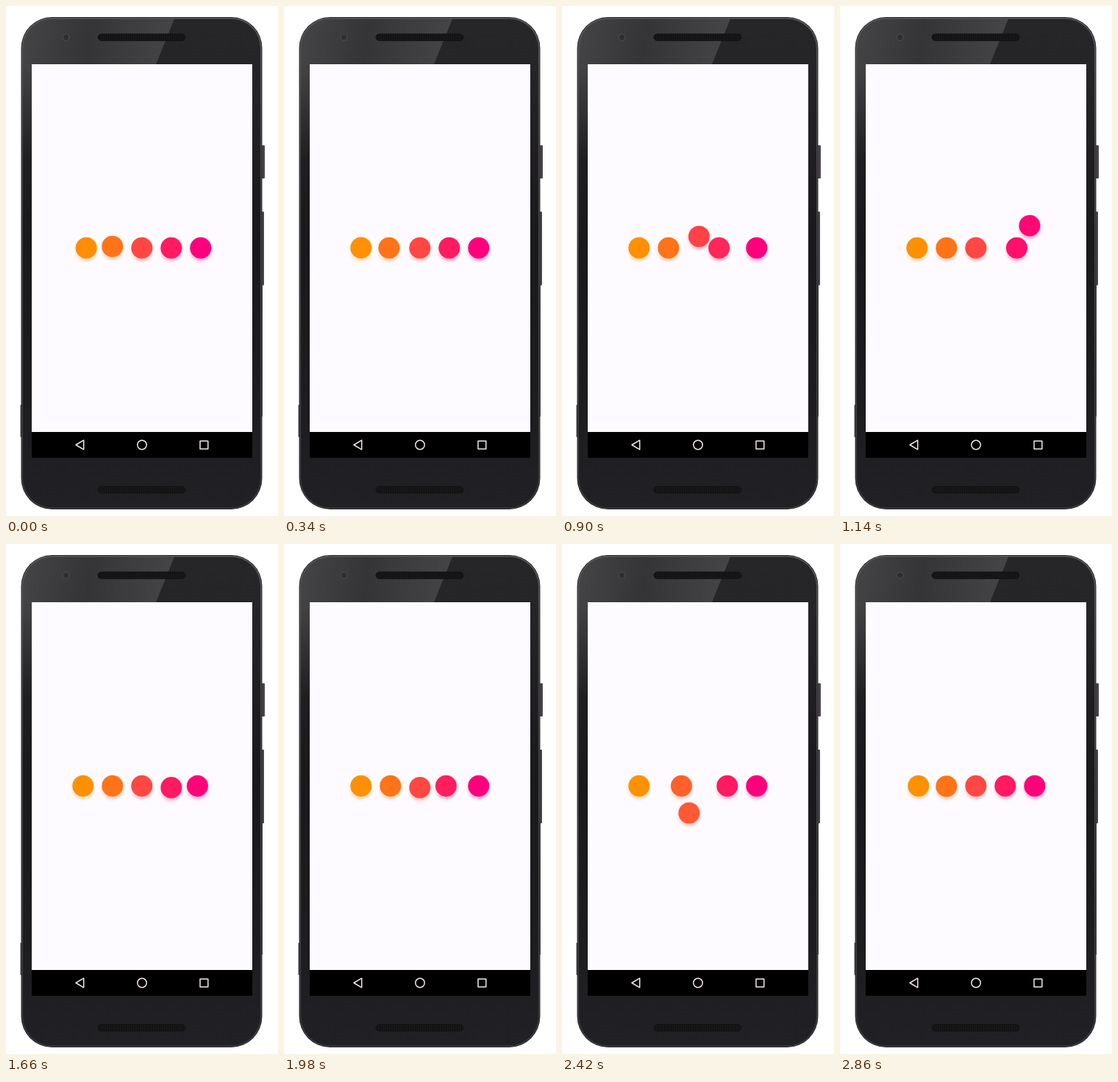
Write an HTML page that moves like this. It is 370 px wide and 692 px high and loops after 3.18 s.

```html
<!DOCTYPE html>
<html lang="en">
<head>
<meta charset="utf-8">
<title>Dot loader</title>
<style>
  html, body { margin: 0; width: 100%; height: 100%; overflow: hidden; background: #fff; }
  svg { display: block; width: 370px; height: 692px; }
  .shadow { opacity: .32; filter: blur(2px); }
</style>
</head>
<body>
<svg viewBox="0 0 370 692">
  <defs>
    <linearGradient id="body" x1="0" y1="0" x2="0" y2="1">
      <stop offset="0" stop-color="#262628"/>
      <stop offset=".1" stop-color="#252527"/>
      <stop offset=".45" stop-color="#19191b"/>
      <stop offset=".8" stop-color="#1d1d20"/>
      <stop offset="1" stop-color="#212125"/>
    </linearGradient>
    <linearGradient id="rim" x1="0" y1="0" x2="0" y2="1">
      <stop offset="0" stop-color="#5a595b"/>
      <stop offset=".3" stop-color="#454347"/>
      <stop offset="1" stop-color="#3a393d"/>
    </linearGradient>
    <linearGradient id="glare" gradientUnits="userSpaceOnUse" x1="25" y1="30" x2="220" y2="50">
      <stop offset="0" stop-color="#fff" stop-opacity=".14"/>
      <stop offset=".45" stop-color="#fff" stop-opacity=".07"/>
      <stop offset="1" stop-color="#fff" stop-opacity=".14"/>
    </linearGradient>
    <linearGradient id="side" x1="0" y1="0" x2="0" y2="1">
      <stop offset="0" stop-color="#fff" stop-opacity=".14"/>
      <stop offset="1" stop-color="#fff" stop-opacity="0"/>
    </linearGradient>
    <pattern id="mesh" width="3" height="3" patternUnits="userSpaceOnUse">
      <rect width="3" height="3" fill="#19191a"/>
      <circle cx="1.5" cy="1.5" r=".9" fill="#0a0a0b"/>
    </pattern>
  </defs>

  <g fill="#49434a">
    <rect x="346" y="189" width="6" height="45" rx="1"/>
    <rect x="346" y="279" width="5" height="100" rx="1"/>
    <rect x="346" y="379" width="3" height="178"/>
    <rect x="19.5" y="541" width="5" height="44" rx="1"/>
  </g>
  <rect x="20.5" y="15" width="328" height="668" rx="42" fill="#29292b"/>
  <rect x="21.5" y="16" width="326" height="666" rx="41" fill="url(#rim)"/>
  <rect x="23" y="17.5" width="323" height="663" rx="39.5" fill="url(#body)"/>
  <path d="M23 79V57A39.5 39.5 0 0 1 62.5 17.5H229L204 79Z" fill="url(#glare)"/>
  <rect x="23" y="79" width="12" height="130" fill="url(#side)"/>

  <circle cx="81.5" cy="42.5" r="5.5" fill="#434345"/>
  <circle cx="81.5" cy="42.5" r="3.5" fill="#2e2e32"/>
  <g fill="url(#mesh)" stroke="#111112">
    <rect x="125" y="38" width="119" height="9" rx="4.5"/>
    <rect x="125" y="652" width="119" height="9" rx="4.5"/>
  </g>

  <rect x="35" y="79" width="300" height="499" fill="#fdfbff"/>
  <rect x="35" y="578" width="300" height="35" fill="#000"/>
  <g fill="none" stroke="#f3e6e9" stroke-width="1.5" stroke-linejoin="round">
    <path d="M95 595.5L105.7 589.2V601.8Z"/>
    <circle cx="185" cy="595.5" r="6.2"/>
    <rect x="264" y="590.2" width="10.8" height="10.8"/>
  </g>
  <g id="dots"></g>
</svg>
<script>
  const LOOP = 3180, STEP = 40, LAST = 30, SPACING = 8;
  const FORWARD = 100, BACK = 1660;
  const X0 = 104.8, Y0 = 328.3, GAP = 40, LIFT = 40;
  const COLORS = [[253, 145, 3], [255, 115, 25], [255, 72, 68], [255, 26, 97], [255, 0, 124]];

  const clamp = (v, lo, hi) => Math.min(hi, Math.max(lo, v));
  const easeSine = t => (1 - Math.cos(Math.PI * t)) / 2;
  const easeQuart = t => t < .5 ? 8 * t ** 4 : 1 - 8 * (1 - t) ** 4;

  const NS = 'http://www.w3.org/2000/svg';
  function add(parent, tag, attrs = {}) {
    const el = parent.appendChild(document.createElementNS(NS, tag));
    for (const key in attrs) el.setAttribute(key, attrs[key]);
    return el;
  }
  const layer = document.getElementById('dots');
  const dots = COLORS.map(() => {
    const g = add(layer, 'g');
    add(g, 'circle', { class: 'shadow', r: 13.8, cy: 4.3 });
    add(g, 'circle', { r: 14.5 });
    return g;
  });

  // Colour at a fractional slot between 0 and 4
  function colorAt(slot) {
    const i = Math.min(3, Math.floor(slot)), f = slot - i;
    return `rgb(${COLORS[i].map((c, n) => Math.round(c + (COLORS[i + 1][n] - c) * f))})`;
  }

  function place(dot, x, y, slot) {
    dot.setAttribute('transform', `translate(${x.toFixed(2)} ${y.toFixed(2)})`);
    dot.setAttribute('fill', colorAt(slot));
  }

  // One dot slides through the row; each neighbour hops over or under it.
  function draw(ms) {
    const back = ms >= BACK;
    const step = clamp(Math.floor((ms - (back ? BACK : FORWARD)) / STEP), 0, LAST);
    let slide = 0;
    for (let i = 0; i < 4; i++) {
      const t = clamp(.2145 + .1075 * (step - SPACING * i), 0, 1);
      const hop = easeQuart(t), angle = Math.PI * hop;
      slide += easeSine(t);
      const mid = back ? 3.5 - i : i + .5;
      const side = back ? -1 : 1;
      const x = X0 + GAP * (mid + side * Math.cos(angle) / 2);
      const y = Y0 - side * LIFT * Math.sin(angle);
      place(dots[i + 1], x, y, mid + side * (.5 - hop));
    }
    slide = clamp(slide, 0, 4);
    const slot = back ? 4 - slide : slide;
    place(dots[0], X0 + GAP * slot, Y0, slot);
  }

  const start = performance.now();
  function tick() {
    draw((performance.now() - start) % LOOP);
    requestAnimationFrame(tick);
  }
  tick();
</script>
</body>
</html>
```
